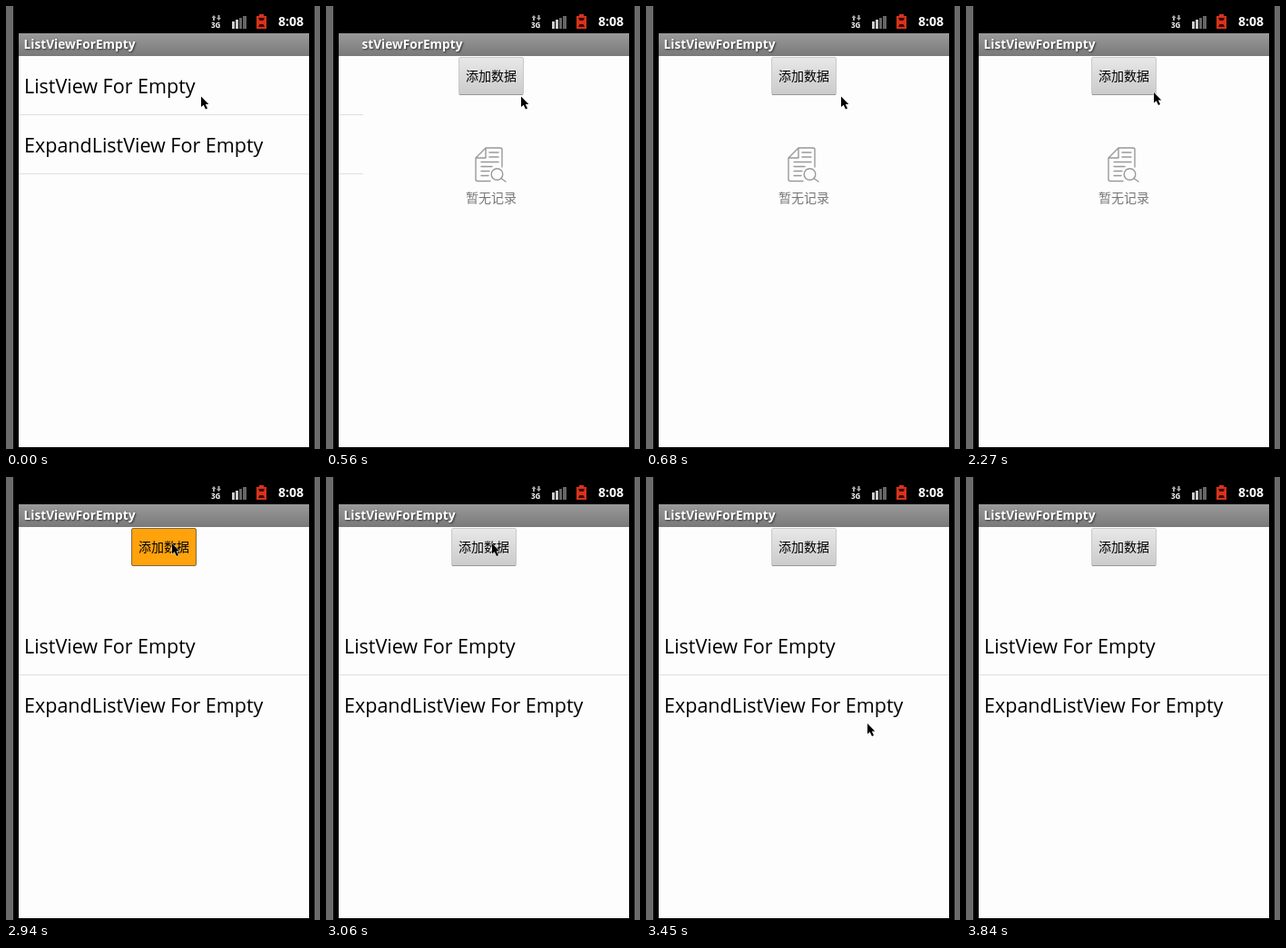
Animation of 346x487 px, one loop 4.15 s. Source, as an HTML page:

```html
<!DOCTYPE html>
<html lang="zh-CN">
<head>
<meta charset="utf-8">
<style>
html, body { margin: 0; width: 100%; height: 100%; overflow: hidden; background: #6b6b6b; }
svg { display: block; }
text { white-space: pre; }
.row { font: 21.5px "Open Sans", "Noto Sans", sans-serif; fill: #000; }
.bold { font: bold 13.7px "Open Sans", "Noto Sans", sans-serif; fill: #fff; }
.title { text-shadow: 1px 1px 2px #333; }
.cjk { font: 14px "Noto Sans CJK SC", "Noto Sans CJK", sans-serif; }
.line { fill: none; stroke: #e0e0e0; }
</style>
</head>
<body>
<svg width="346" height="487" viewBox="0 0 346 487">
  <defs>
    <linearGradient id="bar" x2="0" y2="1">
      <stop stop-color="#9a9a9a"/><stop offset="1" stop-color="#797979"/>
    </linearGradient>
    <linearGradient id="grey" x2="0" y2="1">
      <stop stop-color="#e8e8e8"/><stop offset="1" stop-color="#cbcbcb"/>
    </linearGradient>
    <clipPath id="edge"><rect id="edgeBox" y="30" width="334" height="455"/></clipPath>
  </defs>

  <path d="M8 0H340V487H8z"/>
  <path fill="#fdfdfd" d="M14 55H334V485H14z"/>
  <path fill="url(#bar)" d="M14 30H334V55H14z"/>

  <!-- status bar -->
  <path fill="#aaa" d="M229 10l2.5 3h-1.5v3h-2v-3h-1.500zM234.500 16l-2.500-3h1.500v-3h2v3h1.500z"/>
  <text x="226" y="24" fill="#fff" style="font:bold 8px 'Open Sans',sans-serif">3G</text>
  <path fill="#ccc" d="M249 17h3v8h-3zM253 15h3v10h-3z"/>
  <path fill="#666" d="M257 13h3v12h-3zM261 11h4v14h-4z"/>
  <path fill="#d8321c" d="M279 9h5v2h3v14h-11v-14h3z"/>
  <path fill="#350600" d="M278 13h7l-1.500 3h-4zM278 23h7l-1.500-3h-4z"/>
  <text class="bold" x="300" y="22" style="font-size:14px">8:08</text>

  <g clip-path="url(#edge)">
    <g id="page">
      <text class="bold title" x="19.500" y="47">ListViewForEmpty</text>
      <g id="button">
        <rect id="face" x="138.500" y="56.500" width="71" height="41" rx="1.500"/>
        <path id="base" d="M139 97.500H209" stroke="#999"/>
        <text class="cjk" x="146" y="82">添加数据</text>
      </g>
      <g id="empty">
        <g fill="none" stroke="#999" stroke-width="1.400" stroke-linejoin="round" stroke-linecap="round">
          <path d="M173 192.500H159q-2 0-2-2V167L168 156H184q2 0 2 2V177M168 156V167H157"/>
          <path d="M172 161H182M172 166H182M163 171.500H182M163 176.500H175M163 181.500H172M163 186.500H171"/>
          <circle cx="180.500" cy="185" r="6.300"/>
          <path d="M185 189.500L190 193"/>
        </g>
        <text class="cjk" x="146" y="216" fill="#777">暂无记录</text>
      </g>
    </g>
  </g>

  <g id="list">
    <text class="row" x="20" y="96">ListView For Empty</text>
    <path class="line" d="M14 119.500H334"/>
    <text class="row" x="20" y="161">ExpandListView For Empty</text>
  </g>
  <path id="last" class="line" d="M14 184.500H334"/>
  <path id="leaving" class="line" d="M14 119.500H41M14 184.500H41"/>
  <path id="cursor" d="M0 0V11.500L2.700 9.200L5 14L7 13L4.800 8.500H8.300z" stroke="#fff" stroke-width="1" paint-order="stroke"/>
</svg>
<script>
const LOOP = 4150;
const el = id => document.getElementById(id);
const show = (id, on) => el(id).style.display = on ? "" : "none";
const move = (id, x, y) => el(id).setAttribute("transform", `translate(${x} ${y})`);

// pointer stops: start time, x, y
const stops = [
  [0, 215, 99.5], [2270, 207, 95], [2390, 194, 83], [2510, 183, 73],
  [3330, 215, 170], [3450, 244, 271], [3600, 268, 349], [3720, 296, 437]
];

function draw(t) {
  const home = t < 560, sliding = !home && t < 680;
  const filled = t >= 2940, pressed = filled && t < 3060;

  show("button", !home);
  show("empty", !home && !filled);
  show("list", home || filled);
  show("last", home);
  show("leaving", sliding);
  move("page", sliding ? 8 : 0, 0);
  move("list", 0, filled ? 98 : 0);
  el("edgeBox").setAttribute("x", sliding ? 40 : 0);

  el("face").setAttribute("fill", pressed ? "#ffa20c" : "url(#grey)");
  el("face").setAttribute("stroke", pressed ? "#7d6a45" : "#c9c9c9");
  show("base", !pressed);

  const [, x, y] = stops.filter(s => s[0] <= t).pop();
  move("cursor", x, y);
  show("cursor", t < 3840);
}

const start = performance.now();
function tick() {
  draw((performance.now() - start) % LOOP);
  requestAnimationFrame(tick);
}
tick();
</script>
</body>
</html>
```
